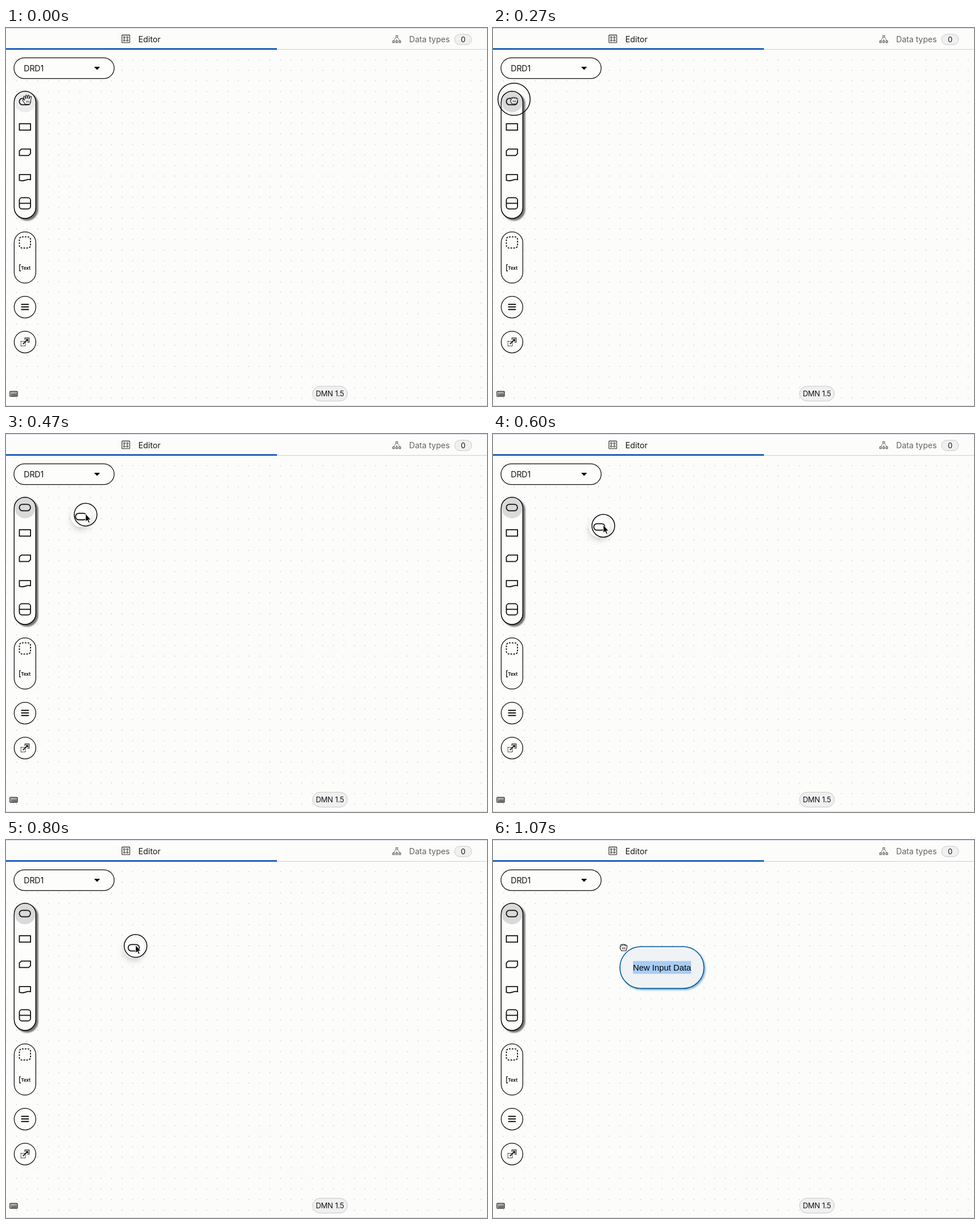
These frames come from a looping animation (845x663 px, 1140 ms). An HTML page:

```html
<!DOCTYPE html>
<html lang="en">
<head>
<meta charset="utf-8">
<title>DMN editor</title>
<style>
  html, body { margin: 0; width: 100%; height: 100%; overflow: hidden; background: #fcfcfa; }
  svg { display: block; }
  text { font-family: Inter, "Open Sans", sans-serif; fill: #151515; }
  .line { fill: none; stroke: #111; stroke-width: 1.8; stroke-linejoin: round; }
  .thin { fill: none; stroke: #222; stroke-width: 1.1; }
  .panel { fill: #fdfdfc; stroke: #0c0c0c; stroke-width: 1.25; }
  .badge { fill: #f0f0f0; stroke: #c9c9d0; stroke-width: 1; }
  .hand { fill: #fff; stroke: #111; stroke-width: 1.1; stroke-linejoin: round; stroke-linecap: round; }
</style>
</head>
<body>
<svg width="845" height="663" viewBox="0 0 845 663">
  <defs>
    <pattern id="grid" width="18.55" height="18.55" patternUnits="userSpaceOnUse" x="-9.275" y="-9.275">
      <circle cx="9.275" cy="9.275" r=".62" fill="#a9a9b2"/>
    </pattern>
    <filter id="soft" x="-60%" y="-60%" width="220%" height="220%">
      <feDropShadow dx="0" dy="5" stdDeviation="5.5" flood-color="#000" flood-opacity=".2"/>
    </filter>
    <filter id="glow" x="-20%" y="-20%" width="140%" height="150%">
      <feDropShadow dx="2" dy="2" stdDeviation="1.8" flood-color="#1679c4" flood-opacity=".55"/>
    </filter>
    <filter id="hard" x="-30%" y="-10%" width="170%" height="120%">
      <feDropShadow dx="3.6" dy="3.2" stdDeviation=".8" flood-color="#6c6c6c" flood-opacity=".95"/>
    </filter>
    <rect id="pill" class="line" x="-9.8" y="-5.7" width="19.6" height="11.4" rx="5.6"/>
  </defs>

  <rect width="845" height="663" fill="#fcfcfa"/>
  <rect y="46" width="838" height="616" fill="url(#grid)"/>

  <!-- tabs -->
  <path d="M0 .5H845" stroke="#d3d3e4"/>
  <path d="M476 37.5H845" stroke="#cfcfd3"/>
  <path d="M0 662.3H845" stroke="#dcdcc9"/>
  <rect y="35.4" width="476" height="2.7" fill="#0b53b5"/>
  <g class="thin">
    <rect x="203.7" y="12.4" width="13.6" height="13.4" rx=".8"/>
    <path d="M206.4 15.2h2.8v2h-2.8zM211.8 15.2h2.8v2h-2.8zM206.4 21h2.8v2h-2.8zM211.8 21h2.8v2h-2.8zM206.4 19.1h2.6M211.8 19.1h2.8" stroke-width=".9"/>
  </g>
  <text x="232.5" y="24.8" font-size="14.2">Editor</text>
  <g class="thin" style="stroke:#606060">
    <path d="M685 13.2h3v3h-3zM679.4 22.6h3v3h-3zM684.9 22.6h3v3h-3zM690.4 22.6h3v3h-3z"/>
    <path d="M685 16.4L681.2 22.2M688 16.4L691.8 22.2M686.5 19.6V22.4" stroke-width=".9"/>
  </g>
  <text x="708.3" y="24.8" font-size="14" style="fill:#626262">Data types</text>
  <rect class="badge" x="788" y="11" width="30" height="18.2" rx="9.1"/>
  <text x="803" y="24.7" font-size="13" text-anchor="middle">0</text>

  <!-- diagram selector -->
  <rect class="panel" x="14" y="52.3" width="176" height="36.4" rx="18.2"/>
  <text x="31.3" y="75.6" font-size="14.2" letter-spacing="-.15">DRD1</text>
  <path d="M155.6 68.5h8.8l-4.4 4.5z" fill="#111" stroke="#111" stroke-linejoin="round"/>

  <!-- node palette -->
  <rect class="panel" x="14.4" y="111" width="38" height="223" rx="19" filter="url(#hard)"/>
  <circle id="hover" cx="33.4" cy="129.6" r="18.3"/>
  <rect class="panel" x="14.4" y="111" width="38" height="223" rx="19" style="fill:none"/>
  <use href="#pill" x="33.2" y="129"/>
  <g class="line">
    <rect x="23.5" y="167.9" width="19.6" height="11.3"/>
    <path d="M26.9 212.4H43.1V220.4L39.7 223.7H23.5V215.7Z"/>
    <path d="M23.5 257.1H43.1V266.2C36.5 263.6 31.5 270.4 23.5 267.2Z"/>
    <rect x="23.5" y="297.7" width="19.6" height="19.6" rx="4.5"/>
    <path d="M23.5 307.5H43.1"/>
  </g>

  <rect class="panel" x="14.4" y="357.6" width="38" height="89.8" rx="19"/>
  <rect class="line" x="23.5" y="366.3" width="19.6" height="19.6" rx="4.5" stroke-dasharray="2.9 2.1"/>
  <path d="M26.2 415.2H23.8V426H26.2" class="line" style="stroke-width:1.3"/>
  <text x="26.3" y="424" font-size="8" font-weight="700">Text</text>

  <circle class="panel" cx="33.4" cy="489.6" r="19"/>
  <path d="M27.4 484.8H39.4M27.4 489.3H39.4M27.4 493.8H39.4" stroke="#111" stroke-width="2.1" stroke-linecap="round"/>

  <circle class="panel" cx="33.4" cy="550.8" r="19"/>
  <g class="thin">
    <path d="M33.2 547V543.6H40.8V551.2H37.4"/>
    <rect x="26.2" y="549.6" width="8" height="8" stroke-dasharray="1.8 1"/>
    <path d="M29.8 554.4L37.6 546.8" style="stroke-width:2"/>
  </g>
  <path d="M34.2 545.4H39.2V550.4Z" fill="#111"/>

  <!-- footer -->
  <rect x="6.9" y="637.3" width="13.2" height="8.8" rx="1.2" fill="#fff" stroke="#111" stroke-width="1.2"/>
  <path d="M8.6 639.6H19M8.6 641.7H19" stroke="#111" stroke-width="1.4" stroke-dasharray="1.5 .7"/>
  <path d="M8.6 643.9H19" stroke="#111" stroke-width="1.4"/>
  <rect class="badge" x="538.5" y="628.3" width="61.3" height="26" rx="13"/>
  <text x="569" y="646" font-size="13" letter-spacing="-.2" text-anchor="middle">DMN 1.5</text>

  <!-- dropped node -->
  <g id="node">
    <rect x="223" y="187" width="147.6" height="73.4" rx="36.7" fill="#eff3f6" stroke="#075a92" stroke-width="1.6" filter="url(#glow)"/>
    <rect id="mark" x="246" y="212.3" width="102" height="22.4" fill="#a8cdf5"/>
    <text x="296.9" y="228.8" font-size="14.85" text-anchor="middle" style="font-family:'Liberation Sans',Arial,sans-serif;fill:#000">New Input Data</text>
  </g>

  <!-- drag preview and pointer -->
  <g id="ghost">
    <circle r="18" fill="#fff" fill-opacity=".9" filter="url(#soft)"/>
    <use href="#pill"/>
  </g>
  <circle id="ring" fill="none" stroke="#0b0b0b" stroke-width="1.5"/>
  <g id="open" class="hand">
    <path d="M-3.4 8.4C-4.4 5.4-7.6 2.8-7.8 .8C-7.4-.8-5.8-.4-4.2 1.4L-6-4.2C-6.2-6.2-4.2-6.6-3.6-4.8L-2.2-1.2L-2.4-6.8C-2.3-8.4-.3-8.4-.1-6.8L.4-1.6L1.6-6.9C2.2-8.3 4.1-7.7 3.8-6L3.2-1L5.4-5C6.4-6.3 8-5.3 7.4-3.6C6.4 0 6.4 4 4.8 8.4Z"/>
    <path d="M-1.2 2.2V5.4M1 2.2V5.4M3.2 2.2V5.4" stroke-width=".8"/>
  </g>
  <g id="closed" class="hand">
    <path d="M-3.8 6C-4.3 4-6.4 2.4-6.2 .2C-6-1.4-5-1.4-4.6-1L-5.2-2.8C-5.2-5-2.8-5.4-2.2-4C-1.8-6 .6-6 .9-4.2C1.6-5.6 3.6-5 3.6-3.5C4.6-4.4 6.4-3.6 6.2-1.8C6.2 1.4 5 3.2 4.4 6Z"/>
    <path d="M-1.8 .2V3M.4 .2V3M2.6 .2V3M-2.2-4V-2.4M.9-4.2V-2.4M3.6-3.5V-2" stroke-width=".9"/>
  </g>
  <path id="arrow" d="M0-1.5V12.6L3.1 9.7L5.2 14.6L7.5 13.6L5.4 8.9H9.4Z" fill="#050505" stroke="#fff" stroke-width=".9" stroke-linejoin="round"/>
</svg>
<script>
  const LOOP = 1140;
  const el = id => document.getElementById(id);
  const [hover, node, mark, ghost, ring] = ["hover", "node", "mark", "ghost", "ring"].map(el);
  const pointers = ["open", "closed", "arrow"].map(el);

  // start ms, pointer, x, y, ring radius, preview offset x, y
  const steps = [
    [0, "open", 37, 125.5, 0],
    [200, "closed", 37, 127, 36],
    [270, "closed", 37, 127, 28.3],
    [330, "closed", 41, 127.5, 20.5],
    [400, "arrow", 92, 131, 20, -10, 4],
    [470, "arrow", 139.8, 141.4, 20, -7.8, 3.4],
    [530, "arrow", 168, 151, 20, -8, 2.8],
    [600, "arrow", 193.8, 161, 20, -7, 2],
    [670, "arrow", 210, 172, 20, -6, 2.6],
    [730, "arrow", 221, 181, 20, -4.6, 3],
    [800, "arrow", 227.6, 185.8, 20, -3.2, 3.2],
    [870, "arrow", 228.4, 187, 20, -3.2, 3.4],
    [930, "closed", 229.3, 188.3, 0]
  ];

  const show = (item, on) => item.setAttribute("visibility", on ? "visible" : "hidden");
  const place = (item, x, y) => item.setAttribute("transform", `translate(${x} ${y})`);

  function draw(t) {
    const [, pointer, x, y, r, dx, dy] = steps.findLast(s => s[0] <= t);
    for (const p of pointers) {
      show(p, p.id === pointer);
      place(p, x, y);
    }
    hover.setAttribute("fill", t < 200 ? "#ececec" : "#dadada");

    show(ring, r > 0);
    ring.setAttribute("r", r);
    place(ring, x, pointer === "closed" ? y - 2 : y);

    show(ghost, dx !== undefined);
    if (dx !== undefined) place(ghost, x + dx, y + dy);

    show(node, t >= 930);
    show(mark, t >= 1000);
  }

  const start = performance.now();
  function tick() {
    draw((performance.now() - start) % LOOP);
    requestAnimationFrame(tick);
  }
  tick();
</script>
</body>
</html>
```
